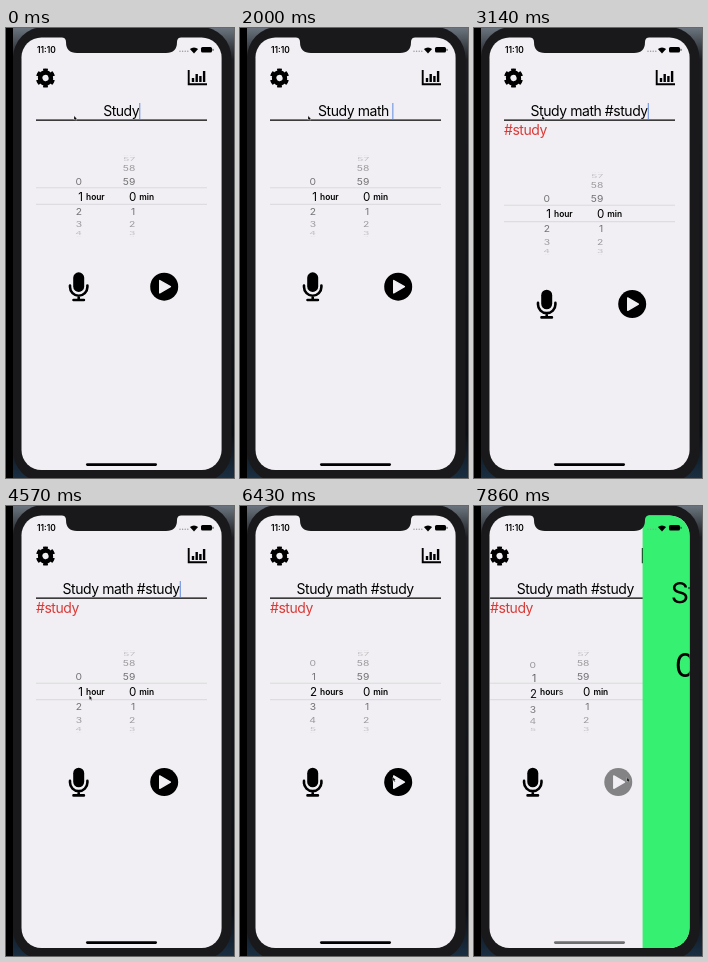
Recreate the animation shown at these times as an HTML page. Size 228x450 px, loop 8 s.

```html
<!DOCTYPE html>
<html lang="en">
<head>
<meta charset="utf-8">
<title>Study timer</title>
<style>
html, body { margin: 0; height: 100%; overflow: hidden; background: #000; }
svg { display: block; width: 100vw; height: 100vh; }
text { font-family: Inter, "Liberation Sans", sans-serif; white-space: pre; }
.big { letter-spacing: -.032em; }
.mid { text-anchor: middle; }
.line { fill: none; stroke: #000; }
</style>
</head>
<body>
<svg viewBox="0 0 228 450">
  <defs>
    <clipPath id="screen"><rect x="15.5" y="9.5" width="200" height="432.5" rx="20"/></clipPath>
    <linearGradient id="desk" x2="0" y2="1">
      <stop offset="0" stop-color="#6b747e"/><stop offset=".07" stop-color="#1b1d21"/>
      <stop offset=".9" stop-color="#0b0e13"/><stop offset="1" stop-color="#1a2f42"/>
    </linearGradient>
  </defs>
  <rect width="228" height="450"/>
  <rect x="7" width="221" height="450" fill="url(#desk)"/>
  <rect x="7" y="-1" width="218.5" height="455" rx="31" fill="#19191b"/>
  <g clip-path="url(#screen)">
    <rect x="15" y="9" width="201" height="434" fill="#f1eff3"/>
    <g id="home">
      <g class="line" transform="translate(39.5 50) rotate(-106)">
        <circle r="5.4" stroke-width="4.6"/>
        <circle r="7.9" stroke-width="3.4" pathLength="12" stroke-dasharray="1.07 .93"/>
      </g>
      <path class="line" stroke-width="1.9" d="M182.7 42V56.3H201"/>
      <path class="line" stroke-width="2.4" d="M187 54v-4M190.7 54v-8M194.4 54v-6M198.1 54v-11"/>
      <text id="title" class="big mid" x="115.2" y="88" font-size="14"></text>
      <path id="caret" stroke="#6f94e0" stroke-width="1.1" d="M0 75V91"/>
      <path class="line" stroke-width="1.1" d="M30 92.1H201"/>
      <text id="tag" class="big" x="30" y="107" font-size="14" fill="#d93a37"></text>
      <g id="body">
        <path fill="none" stroke="#d0ced3" stroke-width=".7" d="M30 159.8H201M30 176.3H201"/>
        <g id="wheels"></g>
        <g font-size="8.4" font-weight="600">
          <text x="80" y="171.7">hour<tspan id="plural">s</tspan></text>
          <text x="133.3" y="171.7">min</text>
        </g>
        <rect x="67.2" y="244.3" width="11" height="19.6" rx="5.5"/>
        <path class="line" stroke-width="2.6" stroke-linecap="round" d="M64 257.5v1.5a8.7 8.7 0 0 0 17.4 0v-1.5M72.7 268v4M67.5 272h10.4"/>
        <g id="play">
          <circle cx="158.2" cy="258.7" r="14"/>
          <path fill="#f1eff3" stroke="#f1eff3" stroke-width="1.4" stroke-linejoin="round" d="M153.7 252.5V264.9L164.4 258.7Z"/>
        </g>
      </g>
    </g>
    <g id="next">
      <rect x="15" y="9" width="202" height="434" fill="#36f072"/>
      <text class="big mid" x="115" y="97.3" font-size="28.4">Study math</text>
      <text class="big mid" x="115" y="171.3" font-size="33.2">02:00:00</text>
    </g>
    <rect id="bar" x="80" y="435.3" width="71" height="2.6" rx="1.3"/>
    <text x="31" y="24.8" font-size="8.4" font-weight="600">11:10</text>
    <path stroke="#9a9a9e" stroke-width="1.5" stroke-linecap="round" stroke-dasharray="0 2.6" d="M174 23.2h8.2"/>
    <path d="M188 25.4l-4.1-4.4a6 6 0 0 1 8.2 0Z"/>
    <rect x="195" y="19" width="11" height="5.6" rx="1.5"/>
    <path class="line" stroke-width=".8" d="M207 20.9v1.9"/>
  </g>
  <path fill="#19191b" d="M56 9H175Q171 10 171 14Q171 25 160 25H71Q60 25 60 14Q60 10 56 9Z"/>
  <path id="mouse" stroke="#fff" stroke-width=".3" d="M0 0V4.2L1 3.4L1.8 4.9L2.5 4.5L1.8 3.1L3 3Z"/>
</svg>
<script>
const $ = id => document.getElementById(id);
const FPS = 7, LOOP = 8000;
const phrase = "Study math #study";
// moments in ms at which each character after "Study" is typed
const keys = [570, 850, 1130, 1280, 1570, 1850, 2280, 2560, 2710, 2850, 2995, 3135];
// pointer stops: time, x, y
const stops = [[3300, 68, 87.8], [4400, 83.3, 189.5], [4800, 83.3, 189.5], [5400, 83.3, 174],
  [5600, 83.3, 174], [6350, 152.8, 271], [7100, 152.8, 271], [7400, 153, 271.6]];

const ease = (t, from, to) => {
  const x = Math.min(1, Math.max(0, (t - from) / (to - from)));
  return x * x * (3 - 2 * x);
};
const move = (id, x, y) => $(id).setAttribute("transform", `translate(${x} ${y})`);

function pointer(t) {
  let [, x, y] = stops[0];
  for (let i = 1; i < stops.length; i++) {
    const k = ease(t, stops[i - 1][0], stops[i][0]);
    x += (stops[i][1] - stops[i - 1][1]) * k;
    y += (stops[i][2] - stops[i - 1][2]) * k;
  }
  return [x, y];
}

// rows of a number wheel, projected from a cylinder
function wheel(right, value, count, wraps) {
  let rows = "";
  for (let n = Math.ceil(value - 4); n <= value + 4; n++) {
    if (!wraps && (n < 0 || n >= count)) continue;
    const a = (n - value) * .38, d = Math.abs(n - value), near = Math.max(0, 1 - d);
    const alpha = d < 1 ? 1 - .48 * d : Math.max(.1, .52 - .16 * (d - 1));
    rows += `<text text-anchor="end" font-size="${10.3 + 1.3 * near}" opacity="${alpha}" transform="translate(${
      right + near} ${168.3 + 41 * Math.sin(a)}) scale(1 ${Math.cos(a)})" y="${3.8 + .4 * near}">${(n + count) % count}</text>`;
  }
  return rows;
}

function draw(t) {
  const text = phrase.slice(0, 5 + keys.filter(k => k <= t).length);
  const tag = (text.match(/#\w+/) || [""])[0];
  $("title").textContent = text;
  $("tag").textContent = tag;
  move("caret", 115.7 + $("title").getComputedTextLength() / 2, 0);
  $("caret").style.display = t < 5000 ? "" : "none";
  move("body", 0, tag ? 17.4 : 0);

  // dragged to two hours, rolling back once the timer starts
  const hours = 1 + ease(t, 4800, 5500) - ease(t, 7714, 8300);
  $("wheels").innerHTML = wheel(76, hours, 24, false) + wheel(129.3, 0, 60, true);
  $("plural").setAttribute("fill-opacity", ease(hours, 1.6, 2));

  const push = ease(t, 7714, 8172);
  $("play").setAttribute("opacity", t > 7700 ? .45 : 1);
  move("home", -60 * push, 0);
  move("next", 200 * (1 - push), 0);
  $("bar").setAttribute("fill", push ? "#6c6f70" : "#000");
  move("mouse", ...pointer(t));
}

function tick() {
  const t = performance.now() % LOOP;
  const step = Math.min(LOOP * FPS / 1000 - 1, Math.floor((t + 5) * FPS / 1000));
  draw(step * 1000 / FPS);
  requestAnimationFrame(tick);
}
tick();
</script>
</body>
</html>
```
